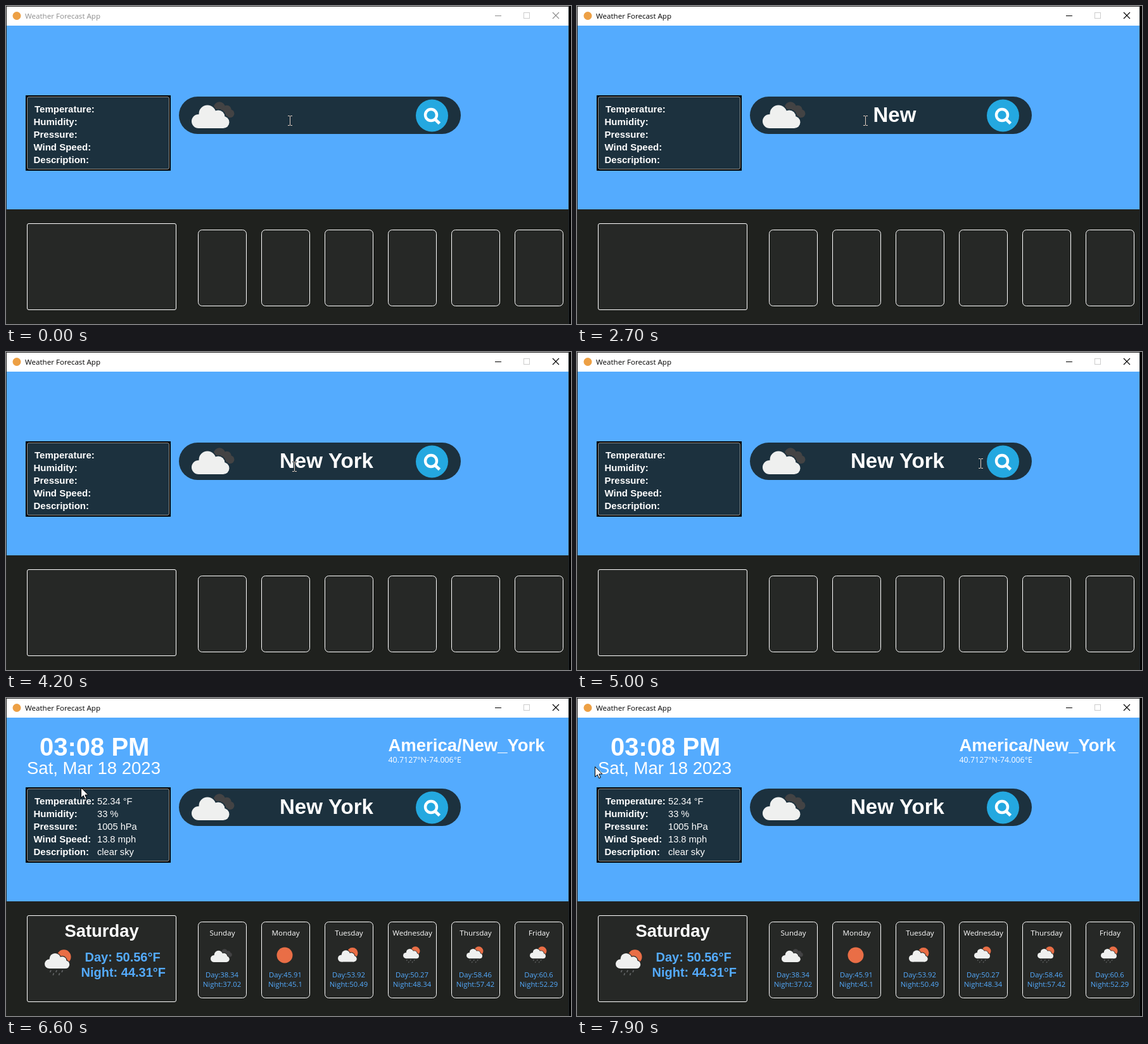
Recreate the animation shown at these times as an HTML page with a canvas. Size 892x502 px, loop 8 s.

```html
<!DOCTYPE html>
<html lang="en">
<head>
<meta charset="utf-8">
<title>Weather Forecast App</title>
<style>
html, body { margin: 0; width: 100%; height: 100%; overflow: hidden; background: #000; }
canvas { display: block; }
</style>
</head>
<body>
<canvas id="stage" width="892" height="502"></canvas>
<script>
const ctx = document.getElementById('stage').getContext('2d');
const LOOP = 8000, STEP = 100;
const FOCUS_AT = 600, PRESS_AT = 5300, RESULT_AT = 5900;
const SKY = '#54abfe', NAVY = '#1c313e', PANEL = '#1f211e', CARD = '#262826';
const SUN = '#e96e46', CLOUD = '#eff0ef', STORM = '#434344';
const ARIAL = '"Liberation Sans", Arial, sans-serif';
const HUMANIST = '"Open Sans", "Noto Sans", sans-serif';

const KEY_TIMES = [1900, 2150, 2350, 2600, 3000, 3250, 3450, 3700];
const QUERY = 'New York';
const DETAILS = [
  ['Temperature:', '52.34 °F'], ['Humidity:', '33 %'], ['Pressure:', '1005 hPa'],
  ['Wind Speed:', '13.8 mph'], ['Description:', 'clear sky']
];
const FORECAST = [
  ['Sunday', '38.34', '37.02', 'clouds'], ['Monday', '45.91', '45.1', 'sun'],
  ['Tuesday', '53.92', '50.49', 'fair'], ['Wednesday', '50.27', '48.34', 'rain'],
  ['Thursday', '58.46', '57.42', 'rain'], ['Friday', '60.6', '52.29', 'rain']
];
// time, x, y of the pointer's hot spot
const POINTER = [
  [0, 448, 181], [300, 448, 181], [900, 455, 181], [4300, 455, 181], [5300, 687, 175],
  [5900, 687, 175], [6500, 118, 141], [6800, 118, 141], [7050, 150, 95],
  [7300, 196, 98], [7600, 80, 93], [7900, 28, 108], [8000, 28, 108]
];

function text(str, x, y, size, { color = '#fff', bold, align = 'left', face = ARIAL } = {}) {
  ctx.font = `${bold ? 'bold ' : ''}${size}px ${face}`;
  ctx.fillStyle = color;
  ctx.textAlign = align;
  ctx.fillText(str, x, y);
}

function rect(x, y, w, h, color) {
  ctx.fillStyle = color;
  ctx.fillRect(x, y, w, h);
}

function roundBox(x, y, w, h, r, fill, stroke) {
  ctx.beginPath();
  ctx.roundRect(x, y, w, h, r);
  ctx.fillStyle = fill;
  ctx.fill();
  if (!stroke) return;
  ctx.strokeStyle = stroke;
  ctx.lineWidth = 1;
  ctx.stroke();
}

function disc(x, y, r, color) {
  ctx.beginPath();
  ctx.arc(x, y, r, 0, 7);
  ctx.fillStyle = color;
  ctx.fill();
}

function line(color, width, ...pts) {
  ctx.strokeStyle = color;
  ctx.lineWidth = width;
  ctx.beginPath();
  for (let i = 0; i < pts.length; i += 4) {
    ctx.moveTo(pts[i], pts[i + 1]);
    ctx.lineTo(pts[i + 2], pts[i + 3]);
  }
  ctx.stroke();
}

// A cloud 60 units wide and 37 high, grown by pad
function cloud(x, y, scale, color, pad = 0) {
  ctx.save();
  ctx.translate(x, y);
  ctx.scale(scale, scale);
  disc(11, 26, 11 + pad, color);
  disc(25, 14, 13.5 + pad, color);
  disc(42, 19, 10.5 + pad, color);
  disc(50, 27.5, 9.5 + pad, color);
  rect(11, 18, 39, 19 + pad, color);
  ctx.restore();
}

function darkClouds(x, y, scale, bg) {
  cloud(x + 27 * scale, y, scale * 0.68, STORM);
  cloud(x, y + 5 * scale, scale, bg, 1.8);
  cloud(x, y + 5 * scale, scale, CLOUD);
}

function sunCloud(x, y, scale, rain) {
  disc(x + 46 * scale, y + 13 * scale, 17 * scale, SUN);
  cloud(x, y + 4 * scale, scale, CARD, 1.8);
  cloud(x, y + 4 * scale, scale, CLOUD);
  if (!rain) return;
  for (let i = 0; i < 5; i++) {
    const dx = x + (15 + i * 7) * scale, dy = y + (i % 2 ? 52 : 45) * scale;
    line('#636566', 2.6 * scale, dx, dy, dx - 2 * scale, dy + 5 * scale);
  }
}

function weatherIcon(kind, x) {
  if (kind === 'clouds') darkClouds(x + 20, 396, 0.5, CARD);
  if (kind === 'sun') disc(x + 37, 406, 12.5, SUN);
  if (kind === 'fair') sunCloud(x + 21, 396, 0.5);
  if (kind === 'rain') sunCloud(x + 24, 394, 0.42, true);
}

function titleBar(active) {
  const ink = active ? '#000' : '#8d8d8d';
  rect(1, 1, 888, 30, '#fff');
  disc(17, 15.5, 6.5, '#eda045');
  text('Weather Forecast App', 30, 20, 11.6, { color: ink, face: HUMANIST });
  line(ink, 1, 772, 15.5, 782, 15.5);
  ctx.strokeStyle = '#ccc';
  ctx.strokeRect(817.5, 10.5, 9, 9);
  line(ink, 1.1, 863, 10, 873, 20, 873, 10, 863, 20);
}

function searchButton(pressed) {
  const d = pressed ? 1 : 0;
  if (pressed) rect(646, 146, 53, 54, '#f0f0ee');
  ctx.save();
  ctx.translate(d, d);
  disc(672.5, 173, 25.5, '#24a8e0');
  ctx.strokeStyle = '#fff';
  ctx.lineWidth = 4.4;
  ctx.beginPath();
  ctx.arc(671, 172, 9, 0, 7);
  ctx.stroke();
  line('#fff', 5, 677, 178.5, 684.5, 185.5);
  ctx.restore();
}

function caretVisible(t) {
  if (t >= RESULT_AT) return (t - RESULT_AT) % 1060 < 530;
  return t >= 2120 && t % 1060 < 530;
}

function searchField(t) {
  roundBox(273, 143, 445, 59, 29.5, NAVY);
  darkClouds(293, 151, 1, NAVY);
  const typed = QUERY.slice(0, KEY_TIMES.filter(k => k <= t).length);
  text(typed, 506, 183, 33, { bold: true, align: 'center' });
  if (caretVisible(t)) rect(Math.round(505.5 + ctx.measureText(typed).width / 2) - 1, 152, 2, 38, '#000');
  searchButton(t >= PRESS_AT && t < RESULT_AT);
}

function details(loaded) {
  rect(31, 141, 229, 119, '#000');
  roundBox(33.5, 143.5, 224, 114, 2.5, NAVY, '#948f88');
  DETAILS.forEach(([label, value], i) => {
    const y = 168 + i * 20;
    text(label, i ? 43.5 : 45, y, 15, { bold: true });
    if (loaded) text(value, 144, y, 14.67);
  });
}

function header() {
  text('03:08 PM', 53, 91, 40, { bold: true });
  text('Sat, Mar 18 2023', 33, 120, 27.5);
  text('America/New_York', 603.5, 84, 27.5, { bold: true });
  text('40.7127°N-74.006°E', 603.5, 102, 12.4, { face: HUMANIST });
}

function forecast(loaded) {
  rect(1, 321, 888, 181, PANEL);
  roundBox(33.5, 343.5, 235, 136, 2.5, CARD, '#fff');
  if (loaded) {
    const blue = { bold: true, color: SKY };
    text('Saturday', 92.5, 377, 27.4, { bold: true });
    sunCloud(61, 400, 0.66, true);
    text('Day: 50.56°F', 124.5, 416, 20, blue);
    text('Night: 44.31°F', 118.5, 440, 20, blue);
  }
  FORECAST.forEach(([day, high, low, kind], i) => {
    const x = 303 + i * 100, mid = x + 38;
    roundBox(x + 0.5, 353.5, 76, 120, 6, CARD, '#fff');
    if (!loaded) return;
    const small = { align: 'center', face: HUMANIST };
    text(day, mid + 0.5, 375, 11.6, small);
    weatherIcon(kind, x);
    text('Day:' + high, mid, 441, 11.3, { ...small, color: SKY });
    text('Night:' + low, mid, 456, 11.3, { ...small, color: SKY });
  });
}

function pointerAt(t) {
  const i = Math.max(1, POINTER.findIndex(p => p[0] >= t));
  const [t0, x0, y0] = POINTER[i - 1], [t1, x1, y1] = POINTER[i];
  const u = (t - t0) / (t1 - t0), e = u * u * (3 - 2 * u);
  return [Math.round(x0 + (x1 - x0) * e), Math.round(y0 + (y1 - y0) * e)];
}

function outlined(path) {
  const shape = new Path2D(path);
  ctx.fillStyle = '#fff';
  ctx.fill(shape);
  ctx.strokeStyle = '#000';
  ctx.lineWidth = 1;
  ctx.stroke(shape);
}

function pointer(t) {
  const [x, y] = pointerAt(t);
  ctx.save();
  ctx.translate(x, y);
  if (t >= RESULT_AT) {
    outlined('M.5 .5V16.5L4.2 13L6.8 18.7L9.3 17.6L6.8 12H11.8Z');
  } else if (x > 646) {
    outlined('M-.5 1.5Q1.2-1 2.5 1.5V8Q4.5 6.5 5.8 8.7Q8 7.7 9 9.8Q11.5 9 11.7 12V16Q11.5 19 9.5 22.5H1Q-.5 19-3.5 16Q-6 12.5-4 12Q-2 12-.5 14Z');
    line('#000', 0.8, 2.5, 8, 2.5, 12, 5.8, 9, 5.8, 12.5, 9, 10, 9, 13);
  } else {
    ctx.globalCompositeOperation = 'difference';
    line('#fff', 1, 0.5, -7, 0.5, 7, -3, -7.5, 0, -7.5, 1, -7.5, 4, -7.5, -3, 7.5, 0, 7.5, 1, 7.5, 4, 7.5);
  }
  ctx.restore();
}

function draw(t) {
  const loaded = t >= RESULT_AT;
  rect(0, 0, 892, 502, '#000');
  rect(0, 0, 889, 502, '#242424');
  titleBar(t >= FOCUS_AT);
  rect(1, 31, 888, 290, SKY);
  if (loaded) header();
  details(loaded);
  searchField(t);
  forecast(loaded);
  rect(888, 1, 1, 501, '#20272c');
  pointer(t);
}

const start = performance.now();
function tick() {
  const t = (performance.now() - start) % LOOP;
  draw(Math.floor(t / STEP) * STEP);
  requestAnimationFrame(tick);
}
tick();
</script>
</body>
</html>
```
